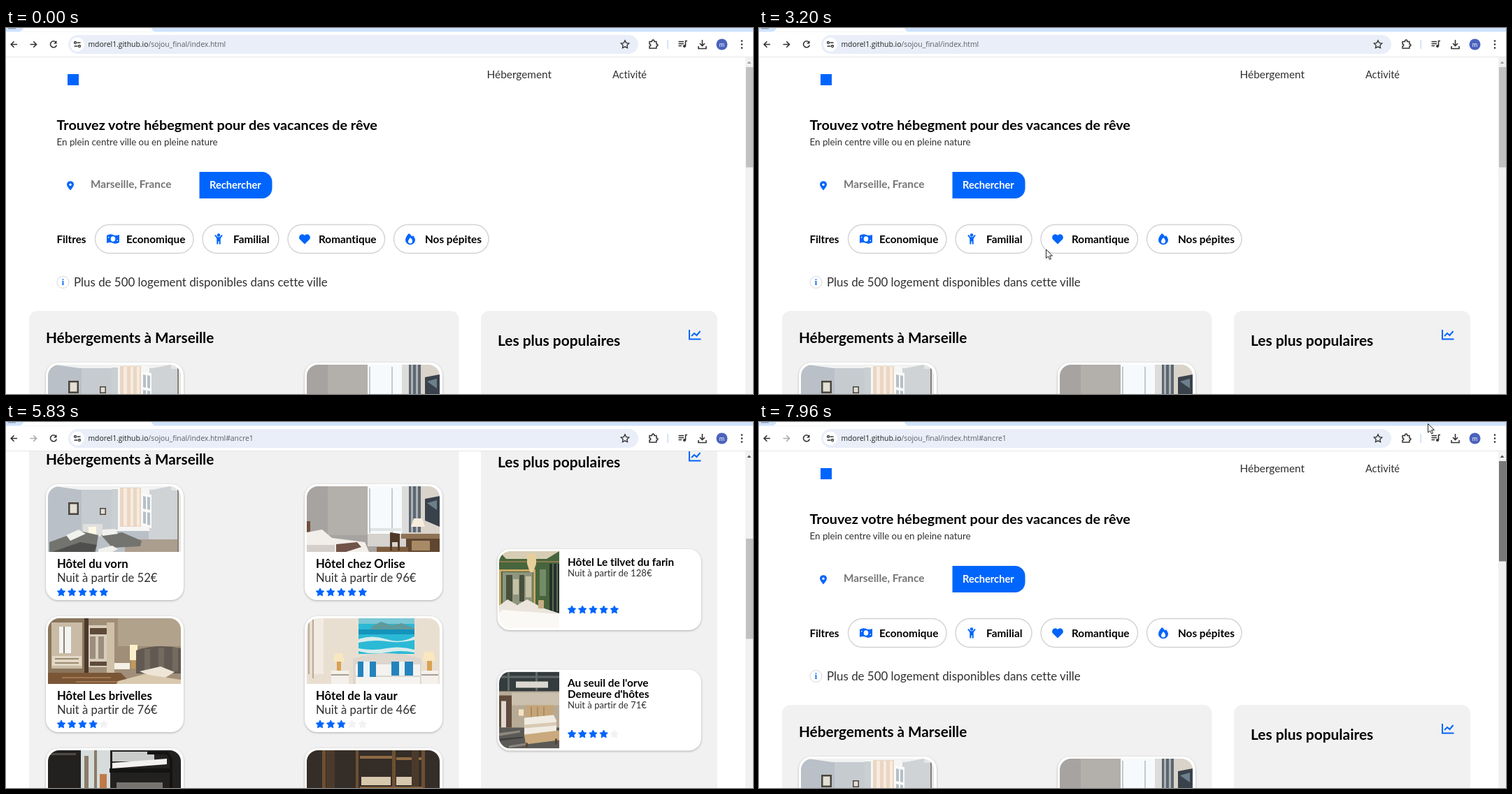
Animation of 1068 by 524 pixels, one loop 8 s. Source, as an HTML page:

```html
<!DOCTYPE html>
<html lang="fr">
<head>
<meta charset="utf-8">
<title>Hébergements</title>
<style>
html, body { margin: 0; width: 100%; height: 100%; overflow: hidden; background: #fff; }
svg { display: block; width: 1068px; height: 524px; }
text { font-family: Lato, sans-serif; white-space: pre; font-variant-ligatures: none; }
.url { font: 10.35px "Open Sans", sans-serif; }
.card { filter: drop-shadow(0 1px 1.5px rgba(0, 0, 0, .28)); }
</style>
</head>
<body>
<svg id="stage" viewBox="0 0 1068 524" xmlns="http://www.w3.org/2000/svg"></svg>
<script>
const BLUE = '#0065fc', THIN = '#303030', LOOP = 8000, NAV_X = 687.5, ANCHOR = 390;
const stage = document.getElementById('stage');
const $ = id => document.getElementById(id);

// --- drawing helpers ---
const text = (x, y, size, str, weight = 400, fill = weight > 400 ? '#000' : THIN, extra = '') =>
  `<text x="${x}" y="${y}" font-size="${size}" font-weight="${weight}" fill="${fill}" ${extra}>${str}</text>`;
const rect = (x, y, w, h, fill, r = 0, extra = '') =>
  `<rect x="${x}" y="${y}" width="${w}" height="${h}" rx="${r}" fill="${fill}" ${extra}/>`;
const path = (d, fill, extra = '') => `<path d="${d}" fill="${fill}" ${extra}/>`;
const line = (d, color = '#333', w = 1.6) => path(d, 'none', `stroke="${color}" stroke-width="${w}"`);
const at = (x, y, body) => `<g transform="translate(${x} ${y})">${body}</g>`;

function starPath(cx, cy, r) {
  let d = '';
  for (let i = 0; i < 10; i++) {
    const a = i * Math.PI / 5 - Math.PI / 2, q = i % 2 ? r * .5 : r;
    d += (i ? 'L' : 'M') + (cx + q * Math.cos(a)).toFixed(2) + ' ' + (cy + q * Math.sin(a)).toFixed(2);
  }
  return d + 'Z';
}
const stars = (x, y, n) => [0, 1, 2, 3, 4].map(i => {
  const c = i < n ? BLUE : '#f2f2f2';
  return path(starPath(x + i * 15.2, y, 6), c, `stroke="${c}" stroke-width="1" stroke-linejoin="round"`);
}).join('');

// --- room pictures: "colour path" pairs ---
const rooms = {
  grey: `#b9c0c7 M0 0h190v94H0z;#c6cbd0 M48 0h44v72H48z;#cfd3d6 M144 0h46v94h-46z;#f0f1f1 M10 0h165l-25 5H45z;#f6f6f4 M91 2h54v62H91z;#c9cfd2 M91 4h9v58h-9z;#ead6c2 M103 2h30v56h-30z;#f7ebe0 M108 3h5v54h-5zM118 3h4v54h-4zM127 3h4v54h-4z;
    #fafafa M133 10l15 2v48l-15 -4z;#b5c0c6 M136 14l4 1v18l-4 -1zM142 15l4 1v18l-4 -1zM136 36l4 1v17l-4 -1zM142 37l4 1v18l-4 -1z;#4b443b M29 23h15v18H29zM74 31h9v10h-9z;#e2dfd7 M31.500 25.500h10v13h-10zM75.500 32.500h6v7h-6z;#dfe0dd M50 54h28v18H50z;#fff8e6 M58 58h11v14H58z;
    #ab9e8e M110 76h80v18h-80z;#73746f M2 80l44 -16 26 6 -4 24H2zM76 70l30 -4 28 12 -2 8 -40 2z;#4f504d M6 94l40 -14 24 4 -4 10z;#f1f1ee M26 70l18 -8 10 6 -22 10zM78 62l18 -1 4 7 -22 3zM72 90l20 -5 8 5 -8 4H72z;#e6e5e2 M176 0h14v94h-5V6h-9z;#85807a M185 4h2v90h-2z`,
  desk: `#a7a3a0 M0 0h190v94H0z;#b3afab M30 0h57v70H30z;#d6d2cd M87 66h55v20H87z;#f7fafc M87 0h50v68H87z;#c3cacf M89 3h2v64h-2zM121 3h2v64h-2z;#dfe3e4 M91 60h44v4H91z;#d9d3ca M140 0h50v72h-50z;#dcdcda M136 0h10v70h-10z;#5b6670 M146 0h17v66h-17z;
    #aeb2b4 M149 0h3v66h-3zM156 0h3v66h-3z;#39424b M169 18l21 -4v44l-21 -9z;#6e7f8c M172 24l14 -4v14z;#f6eddd M153 46h12l4 12h-20z;#8f7355 M135 68h55v7h-55z;#5f4630 M142 75h48v19h-48z;#7d5b3c M100 87h45v7h-45z;#4f3827 M119 66l14 2v24h-3V80h-8v12h-3z;#a98a66 M150 78h26v14h-26z;
    #71503a M0 50h5v28H0z;#f2efeb M0 66l22 -4 14 12 47 6 6 14H0z;#d4cfcb M0 84h40v10H0z;#725349 M42 83l30 -3 6 7 -22 7H42z`,
  brown: `#a08e78 M0 0h190v94H0z;#b1a28c M100 0h90v40h-90z;#8a755c M0 0h57v94H0z;#c9bba5 M5 6h44v66H5z;#f2f4f3 M16 12h17v38H16z;#95816a M22 12h2v38h-2z;#e3d8c6 M6 54h42v14H6z;#9b8a71 M10 57h34v2H10zM10 63h34v2H10z;#4c382a M52 0h6v94h-6z;#d8cdbb M58 10h36v60H58z;
    #5f4a39 M60 14h24v9H60zM60 62h24v6H60z;#9b8e7e M60 26h8v32h-8zM72 26h8v32h-8z;#cfc0a8 M84 6h11v80H84z;#f5f0e6 M95 64h22v9H95z;#fbefca M117 38h11v22h-11z;#c49a55 M119 60h6v12h-6z;#625a52 M126 46q30 -10 64 -3v36h-64z;#746a60 M138 44h8v34h-8zM158 42h8v34h-8zM178 42h8v34h-8z;
    #7b5636 M0 78h104l16 16H0z;#9f7850 M20 84h70v2H20zM40 90h70v2H40z;#efe5d6 M131 76l30 -7 20 8 -20 12z;#d8c9ae M100 90l38 -10 52 8v6h-92z`,
  sea: `#e9dfd1 M0 0h190v94H0z;#b8aa98 M2 0h2v80H2zM8 0h2v86H8z;#f2ebe2 M10 0h14v80H10z;#2bb9d6 M74 0h80v51H74z;#7cc8d6 M74 0h80v8H74z;#5f9a9c M92 12l14 -7 16 5 14 -3 18 7v2H92z;#1593bb M74 16h80v7H74z;#d7eceb M74 30q20 -7 40 0t40 -4v5q-20 5 -40 2t-40 2zM74 43q20 4 40 0t40 2v4q-20 -4 -40 0t-40 -2z;
    #ddd6cd M66 58q48 -16 98 0v36H66z;#f5f3f0 M70 66h92v28H70z;#d9d5d0 M70 82h92v2H70z;#2483bd M73 62h26v22H73zM121 62h31v20h-31z;#eaf4f7 M81 62h9v22h-9zM132 62h8v20h-8z;#f8e7bf M41 50h10l3 12H38zM168 48h13l3 13h-19z;#d9a153 M43 62h6v13h-6zM172 61h7v14h-7z;#f4f0eb M35 75h25v19H35zM164 75h24v19h-24z;
    #a99e91 M35 80h25v2H35zM164 80h24v2h-24z`,
  bunk: `#232120 M0 0h190v94H0z;#4f4a45 M0 4h40v3H0z;#d6dcdc M47 0h42v94H47z;#8c7b67 M52 8h6v86h-6zM66 0h4v94h-4z;#c07a48 M74 34h10v60H74z;#c9ccca M92 2h60v14H92z;#f2f1ef M92 18l78 -6v8l-78 6z;#131313 M88 26h88v6H88zM142 2h30l6 10v60h-4V14l-4 -8h-28z;#77736e M98 46h66v48H98z`,
  wood: `#352d27 M0 0h190v94H0z;#6d4f32 M22 0h5v94h-5zM70 0h4v94h-4zM122 0h5v94h-5zM164 0h5v94h-5z;#8f6a44 M76 8h46v4H76zM128 10h36v4h-36z;#4b3a2c M28 0h12v94H28zM150 0h10v94h-10z;#d7c7ad M78 38h42v12H78zM128 38h22v12h-22z;#87613c M76 52h90v8H76z`,
  green: `#47653c M0 0h86v110H0z;#d7cdb5 M0 0h86l-18 11H10z;#8a7a4c M0 14h86v2H0z;#caa764 M0 26h52v3H0zM0 29h3v50H0zM49 29h3v50h-3z;#8f957e M5 30h43v46H5z;#48503c M10 34h9v38h-9zM29 34h7v38h-7z;#c5c1a6 M20 40h8v22h-8zM38 36h8v30h-8z;#e6cf9b M40 4h13v14l-4 12h-5l-4 -12z;#243029 M72 18h14v70H72z;
    #5c6a56 M76 18h2v68h-2zM82 18h2v68h-2z;#748b67 M58 26h9v38h-9z;#eae4dc M0 78l12 -9 14 8 14 -8 22 12 24 8v21H0z;#fbf9f6 M4 84l82 6v20H0V88z;#c6ac83 M56 70h8v12h-8z`,
  loft: `#b7aa96 M0 0h86v110H0z;#343c3d M0 0h86v28H0z;#606867 M0 6h86v3H0zM12 0h3v28h-3zM52 0h3v28h-3z;#dcd8d0 M24 14h46v9H24z;#cbc0ae M18 30h68v18H18z;#614b3c M0 34h18v46H0z;#dfd9cf M3 42h7v38H3z;#5b5a57 M0 80h86v30H0z;#8d8880 M0 88l30 -4v3L0 92zM14 106l26 -4v3l-26 4z;#3f3f3e M0 96l34 -3v2L0 99z;
    #c5a57a M38 48h40v26H38z;#ad8c62 M45 50h2v20h-2zM54 50h2v20h-2zM63 50h2v20h-2z;#f6e4bd M28 54h7v9h-7z;#f1ece3 M36 66l42 -4 4 8v18l-46 4z;#d8cab5 M36 76l46 -4v5l-46 4z;#c9a97d M36 90l50 -6v14l-48 6z;#58442f M38 102h3v6h-3zM80 96h3v8h-3z`
};
const room = (name, x, y, clip) => at(x, y, `<g clip-path="url(#${clip})"><g filter="url(#soft)">` +
  rooms[name].split(';').map(s => {
    s = s.trim();
    const i = s.indexOf(' ');
    return path(s.slice(i + 1), s.slice(0, i));
  }).join('') + '</g></g>');

const hotel = (x, y, pic, name, price, n) =>
  rect(x - 3, y - 3, 197, 166, '#fff', 18, 'class="card"') + room(pic, x, y, 'top') +
  text(x + 13, y + 116.6, 16.7, name, 700) +
  text(x + 13, y + 137, 16.65, `Nuit à partir de ${price}€`) + stars(x + 19, y + 152, n);

const popular = (y, pic, lines, price, n, starY) =>
  rect(702.5, y - 3, 291.5, 116, '#fff', 18, 'class="card"') + room(pic, 705, y, 'side') +
  lines.map((s, i) => text(803, y + 21.2 + i * 16.5, 15.3, s, 700)).join('') +
  text(803, y + 19.5 + lines.length * 16.3, 13.1, `Nuit à partir de ${price}€`) + stars(809, y + starY, n);

// --- filter pills ---
const pills = [
  { x: 127.5, w: 140.5, tx: 172, label: 'Economique',
    icon: path('M144 297q5 -3 9 -1t9 0v11q-5 3 -9 1t-9 0z', BLUE) +
      '<ellipse cx="153" cy="302" rx="3.3" ry="3.8" fill="#fff"/>' + path('M146 299h2l-2 2zM160 305h-2l2 -2z', '#fff') },
  { x: 281, w: 109, tx: 325, label: 'Familial',
    icon: `<circle cx="304" cy="296.5" r="2.3" fill="${BLUE}"/>` + line('M299 296.5l3 4h4l3 -4', BLUE, 2) +
      path('M301.3 299.5h5.4v10h-2v-4h-1.4v4h-2z', BLUE) },
  { x: 403, w: 138.5, tx: 447, label: 'Romantique',
    icon: path('M427 309.5l-7 -7c-3 -4 2 -9.5 6 -6.5l1 1 1 -1c4 -3 9 2.5 6 6.5z', BLUE) },
  { x: 554.5, w: 135.5, tx: 599, label: 'Nos pépites',
    icon: path('M576 294q3 2 4.5 4.5l1.5 -1.5q3 4 3 6.5a7 6.8 0 0 1 -14 0q0 -4 5 -9.5z', BLUE) +
      path('M578 300q3.5 3 3 5.5a3 3 0 0 1 -6 0q0 -2 3 -5.5z', '#fff') }
];
const pillY = 281.5, pillH = 41;
const filters = pills.map((p, i) =>
  rect(p.x, pillY, p.w, pillH, '#fff', pillH / 2, `id="pill${i}" stroke="#d3d3d3" stroke-width="1.4"`) +
  p.icon + text(p.tx, 308, 15.35, p.label, 700)).join('');

const page =
  rect(88, 66, 16, 16, BLUE) +
  `<g id="nav">${rect(654, 42, 158, 3.5, BLUE, 0, 'id="bar"')}${text(NAV_X, 71.5, 15.4, 'Hébergement', 400, THIN, 'id="link"')}</g>` +
  text(867, 71.5, 14.5, 'Activité') +
  text(72.5, 146, 19.8, 'Trouvez votre hébegment pour des vacances de rêve', 700) +
  text(72.5, 168, 13.35, 'En plein centre ville ou en pleine nature') +
  path('M92 232.5q-5 -6 -5 -8.5a5 4.8 0 0 1 10 0q0 2.5 -5 8.5z', BLUE) +
  '<circle cx="92" cy="224.3" r="1.7" fill="#fff"/>' +
  text(121, 229, 15.35, 'Marseille, France', 700, '#757575') +
  path('M276.5 206H366a14.5 14.5 0 0 1 14.5 14.5v9a14.5 14.5 0 0 1 -14.5 14.5H276.5z', BLUE) +
  text(291, 230, 14.65, 'Rechercher', 700, '#fff') +
  text(72.5, 308, 15.1, 'Filtres', 700) + filters +
  '<circle cx="81.5" cy="364" r="8.5" fill="#fff" stroke="#d8d8d8"/>' +
  `<text x="81.5" y="368" text-anchor="middle" fill="${BLUE}" style="font:700 12px 'Liberation Serif',serif">i</text>` +
  text(97, 370, 16.9, 'Plus de 500 logement disponibles dans cette ville') +
  rect(33, 405, 614.5, 700, '#f1f1f1', 12) + rect(679, 405, 338, 700, '#f1f1f1', 12) +
  text(57, 451, 20.7, 'Hébergements à Marseille', 700) +
  text(703, 455, 20.9, 'Les plus populaires', 700) +
  line('M977 432v13.5h16.5M980 441l4 -4 3.5 3 5 -6', BLUE, 2) +
  hotel(60, 482, 'grey', 'Hôtel du vorn', 52, 5) +
  hotel(430, 482, 'desk', 'Hôtel chez Orlise', 96, 5) +
  hotel(60, 671, 'brown', 'Hôtel Les brivelles', 76, 4) +
  hotel(430, 671, 'sea', 'Hôtel de la vaur', 46, 3) +
  hotel(60, 860, 'bunk', 'Hôtel du grand sarn', 63, 4) +
  hotel(430, 860, 'wood', 'Hôtel Les ormelis', 58, 4) +
  popular(575, 'green', ['Hôtel Le tilvet du farin'], 128, 5, 84) +
  popular(747.5, 'loft', ["Au seuil de l'orve", "Demeure d'hôtes"], 71, 4, 89.5);

// --- browser frame ---
const chrome =
  rect(0, 0, 1068, 42, '#fff') + rect(0, 0, 1068, 5.5, '#d0e3fc') +
  path('M18 5.5q6 -1 7 -5.5h183q1 5 7 5.5z', '#fff') + rect(3, 0, 11, 1.5, '#8fa3bd') +
  rect(0, 41, 1068, 1, '#e3e6ea') + rect(89, 10, 815, 27, '#e9eef8', 13.5) +
  line('M16 23.5H7.5M11.5 19.2l-4.3 4.3 4.3 4.3') +
  `<g id="fwd" stroke="#333">${path('M34.5 23.5H43M39.2 19.2l4.3 4.3 -4.3 4.3', 'none', 'stroke-width="1.6"')}</g>` +
  line('M71.5 20.5a4.5 4.5 0 1 0 .8 4') + path('M72.5 18v4.5H68z', '#333') +
  '<circle cx="102" cy="23.5" r="10" fill="#fff"/>' +
  line('M101.5 21h5M97.5 26h5', '#333', 1.4) +
  '<g fill="none" stroke="#333" stroke-width="1.3"><circle cx="99" cy="21" r="1.5"/><circle cx="105" cy="26" r="1.5"/></g>' +
  `<text class="url" x="117.5" y="27" fill="#1f1f1f">mdorel1.github.io<tspan fill="#5a5e66">/sojou_final/index.html<tspan id="hash"></tspan></tspan></text>` +
  line(starPath(885, 23.8, 6), '#333', 1.3) +
  line('M920 19.5h3.5q0 -2.5 1.7 -2.5t1.7 2.5h3v3.5q2 0 2 1.5t-2 1.5v3H920v-3q1.8 0 1.8 -1.5t-1.8 -1.5z', '#333', 1.5) +
  rect(945.5, 17, 1.5, 13, '#c9dcf7') +
  line('M961.5 19.5h7.5M961.5 22.5h7.5M961.5 25.5h4.5M971.5 26v-7.5h2.5') +
  '<circle cx="970" cy="26" r="2" fill="#333"/>' +
  line('M995.5 17v8M992 22l3.5 3.5 3.5 -3.5M990 26v3.5h11V26') +
  '<circle cx="1023.5" cy="23.5" r="8" fill="#4a63bd"/>' +
  text(1023.5, 26.5, 9, 'm', 400, '#fff', 'text-anchor="middle"') +
  [18.5, 23.5, 28.5].map(y => `<circle cx="1052" cy="${y}" r="1.3" fill="#333"/>`).join('') +
  rect(1057, 42, 11, 482, '#f1f1f1') + path('M1059.5 51h6l-3 -3.5z', '#a3a3a3', 'id="up"') +
  rect(1058, 56, 10, 143.5, '#c1c1c1', 0, 'id="thumb"');

const pointer =
  '<circle id="glow" r="9.5" fill="#ffff40" opacity=".6"/><g id="cursor">' +
  path('M.5 .5V13l3 -2.6 2 4.5 2 -.9 -2 -4.4h4z', '#fff', 'id="arrow" stroke="#222" stroke-width="1"') +
  path('M-1 1q1 -1.5 2 0v5.5l5 1q1.5 .5 1.5 2l-1 4v2.5H.5V14l-4 -4.5q0 -1.5 1.5 -1l1 1z', '#fff', 'id="hand" stroke="#222" stroke-width="1"') +
  `<g id="beam">${line('M-3 -6h2.3l.7 .7 .7 -.7H3M0 -5.5V6M-3 6.5h2.3l.7 -.7 .7 .7H3', '#333', 1.2)}</g></g>`;

stage.innerHTML =
  '<defs><clipPath id="top"><path d="M0 94V16a16 16 0 0 1 16 -16h158a16 16 0 0 1 16 16v78z"/></clipPath>' +
  '<clipPath id="side"><path d="M86 0v110H16a16 16 0 0 1 -16 -16V16A16 16 0 0 1 16 0z"/></clipPath>' +
  '<filter id="soft"><feGaussianBlur stdDeviation=".7"/></filter></defs>' +
  rect(0, 0, 1068, 524, '#fff') + `<g id="page">${page}</g>` + chrome + pointer;

// --- motion: start, end, steps, target x, target y ---
const moves = [
  [740, 740, 1, 890, 353], [800, 880, 2, 843, 134], [1250, 1360, 3, 517, 203],
  [1640, 1640, 1, 500, 206], [1690, 1810, 3, 379, 214], [1990, 2160, 4, 286, 241],
  [2360, 2620, 5, 190, 303], [2890, 3200, 6, 410, 316.5], [3260, 3440, 4, 559, 316],
  [3700, 3750, 2, 605, 305], [4070, 4490, 8, 744, 60], [5060, 5170, 3, 743.5, 59.5],
  [5690, 5830, 3, 1147, 226], [6200, 6310, 2, 1066, 250], [6570, 6795, 4, 926, 232],
  [6870, 7020, 3, 1080, 234], [7960, 7960, 1, 956, 2]
];
const smooth = p => p * p * (3 - 2 * p);

function cursorAt(t) {
  let x = 890, y = 353;
  for (const [a, b, n, tx, ty] of moves) {
    if (t < a) break;
    const gap = n > 1 ? (b - a) / (n - 1) : 1;
    const p = smooth(Math.min(n, Math.floor((t - a) / gap + 1e-6) + 1) / n);
    x += (tx - x) * p;
    y += (ty - y) * p;
  }
  return [x, y];
}

// The page trails the dragging pointer by one step.
const dragTimes = [7440, 7500, 7580, 7640, 7700, 7760];
const dragScroll = [390, 390, 267, 110, 0, 0];
const dragY = [236, 201, 109, 50, 8, -30];

function inPill(p, x, y) {
  const r = pillH / 2 - 1, cy = pillY + pillH / 2;
  const cx = Math.max(p.x + pillH / 2, Math.min(p.x + p.w - pillH / 2, x));
  return Math.hypot(x - cx, y - cy) < r;
}
const show = (id, on) => $(id).setAttribute('visibility', on ? 'visible' : 'hidden');
const fill = (id, c) => $(id).setAttribute('fill', c);
const move = (id, x, y) => $(id).setAttribute('transform', `translate(${x} ${y})`);

function draw(t) {
  const step = dragTimes.filter(d => t >= d).length - 1;
  const scroll = t < 5310 ? 0 : step < 0 ? ANCHOR : dragScroll[step];
  const [x, y] = cursorAt(t), seen = t >= 740, live = seen && scroll === 0;

  move('page', 0, -scroll);
  move('thumb', 0, scroll * .2846);
  fill('thumb', t >= 7500 ? '#787878' : '#c1c1c1');
  fill('up', t >= 5310 ? '#505050' : '#a3a3a3');
  $('hash').textContent = t >= 5115 ? '#ancre1' : '';
  $('fwd').setAttribute('stroke', t >= 5115 ? '#a9abae' : '#333');

  pills.forEach((p, i) => fill('pill' + i, live && inPill(p, x, y) ? '#deebff' : '#fff'));
  const nav = live && x > 654 && x < 812 && y > 42 && y < 95;
  show('bar', nav);
  fill('link', nav ? BLUE : THIN);
  move('link', 0, nav ? 11 : 0);

  const beam = t >= 5115 && t < 5690, hand = nav && !beam;
  move('cursor', x, y);
  show('arrow', seen && !beam && !hand);
  show('hand', hand);
  show('beam', beam);

  const click = t >= 5060 && t < 5115;
  show('glow', click || step >= 0);
  if (step >= 0) move('glow', 1067.5, dragY[step]);
  else move('glow', x, y);
}

const start = performance.now();
function tick() {
  draw((performance.now() - start) % LOOP);
  requestAnimationFrame(tick);
}
tick();
</script>
</body>
</html>
```
